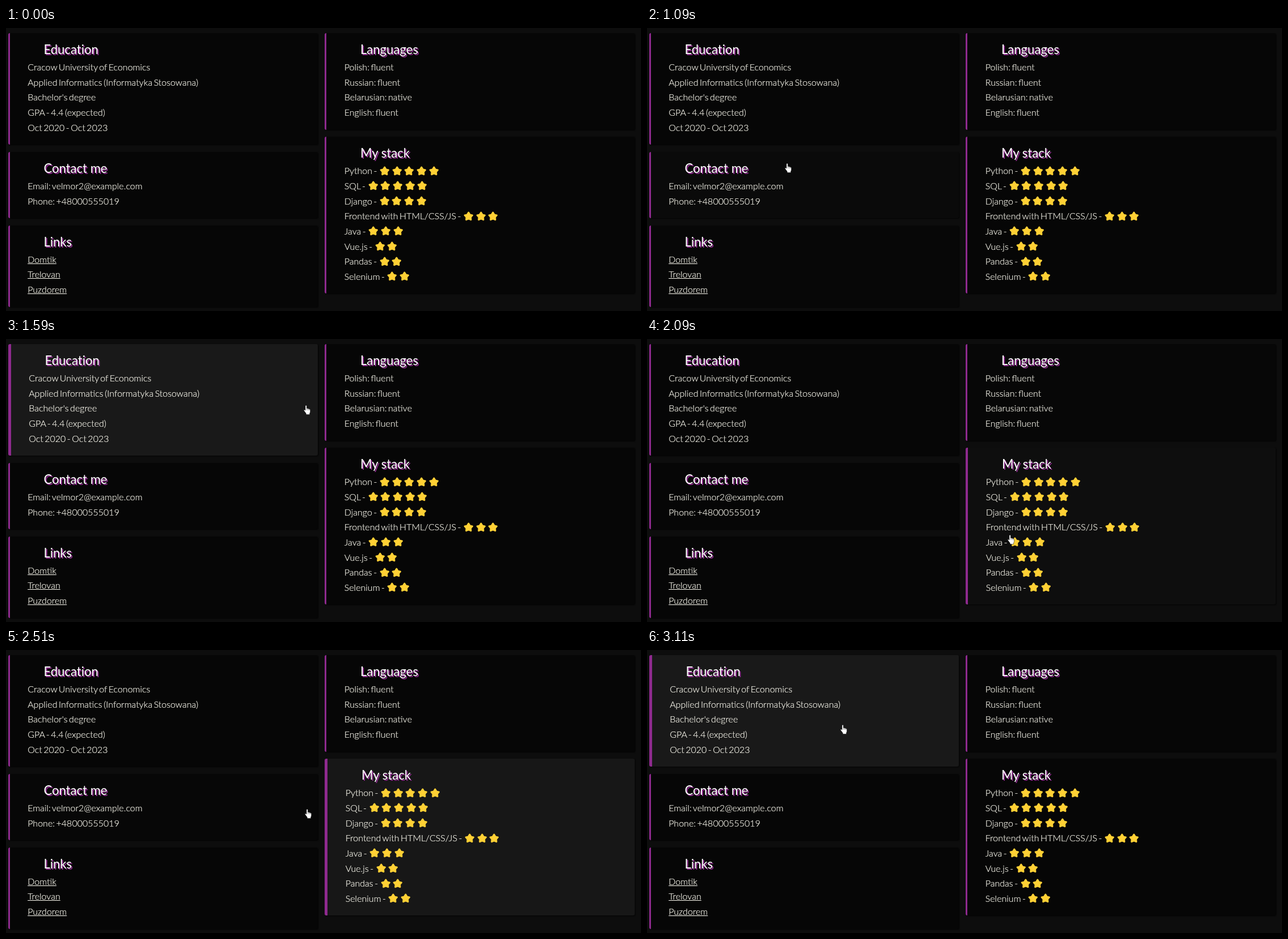
Recreate the animation shown at these times as an HTML page. Size 1120 by 500 pixels, loop 3210 ms.

```html
<!DOCTYPE html>
<html lang="en">
<head>
<meta charset="utf-8">
<title>About me</title>
<style>
html, body { margin: 0; width: 100%; height: 100%; overflow: hidden; background: #0d0d0d; }
body { position: relative; font: 300 16px Lato, sans-serif; color: #fffdf2; }
.col { position: absolute; top: 9px; width: 546.6px; }
.card {
  box-sizing: border-box; margin-bottom: 12.6px; padding: 10px 0 17px 31.4px;
  border-left: 3px solid #8e2a8e; border-radius: 3px;
  background: #060606; box-shadow: 1px 1px 2px #040404; white-space: pre;
}
h2 {
  margin: 0 0 0 28.2px; font-size: 22.1px; font-weight: 400; line-height: 37px;
  color: #fff; text-shadow: 2px 2px #8e2a8e; font-variant-ligatures: none;
}
p {
  margin: 0; height: 26.67px; line-height: 26.67px;
  word-spacing: -1.85px; -webkit-text-stroke: .2px;
}
u { text-decoration-thickness: 1px; }
.star { width: 21.7px; height: 17px; vertical-align: -2.6px; }
.star path { fill: #ffd035; stroke: #ffd035; stroke-width: 3; stroke-linejoin: round; }
#hand { position: absolute; left: 0; top: 0; width: 12px; height: 17px; overflow: visible; }
</style>
</head>
<body>
<div class="col" style="left:3.8px"></div>
<div class="col" style="left:562.4px"></div>
<svg id="hand" viewBox="0 0 12 17">
  <path fill="#fff" stroke="#000" stroke-width=".5" d="M3 1.5Q3 .2 4.2 .2T5.4 1.5V5.6Q7.3 5.2 7.6 6.2Q9.3 5.8 9.6 6.8Q11.6 6.6 11.6 8.4V11.5Q11.6 13 10.6 14.2V16.5H4.4V15Q3.6 13.6 2 11.6L.4 9.3Q0 8.2 1 7.9Q2 7.8 3 9.2Z"/>
  <path stroke="#333" stroke-width=".5" d="M5.4 6v3M7.6 6.4v2.8M9.6 7v2.3"/>
</svg>
<script>
const LOOP = 3210, START = 690, FADE = 300;

const starPath = 'M' + Array.from({ length: 10 }, (_, i) => {
  const r = i % 2 ? 3.9 : 7, a = Math.PI * (i / 5 - 0.5);
  return (10.85 + r * Math.cos(a)).toFixed(2) + ' ' + (9 + r * Math.sin(a)).toFixed(2);
}).join('L') + 'Z';
const star = `<svg class="star" viewBox="0 0 21.7 17"><path d="${starPath}"/></svg>`;
const skill = (name, n) => `${name} - ${star.repeat(n)}`;

// hover: [enter, leave] times in ms
const cards = [
  { col: 0, title: 'Education', hover: [[1330, 1590], [2845, 9999]], lines: [
    'Cracow University of Economics', 'Applied Informatics (Informatyka Stosowana)',
    "Bachelor's degree", 'GPA - 4.4 (expected)', 'Oct 2020 - Oct 2023'] },
  { col: 0, title: 'Contact me', hover: [[1000, 1240], [2480, 2810]], lines: [
    'Email: velmor2@example.com', 'Phone: +48000555019'] },
  { col: 0, title: 'Links', hover: [[690, 840]], lines: [
    '<u>Domtik</u>', '<u>Trelovan</u>', '<u>Puzdorem</u>'] },
  { col: 1, title: 'Languages', hover: [[1640, 1830]], lines: [
    'Polish: fluent', 'Russian: fluent', 'Belarusian: native', 'English: fluent'] },
  { col: 1, title: 'My stack', hover: [[1960, 2440]], lines: [
    skill('Python', 5), skill('SQL', 5), skill('Django', 4), skill('Frontend with HTML/CSS/JS', 3),
    skill('Java', 3), skill('Vue.js', 2), skill('Pandas', 2), skill('Selenium', 2)] }
];

// pointer path: time, x, y
const path = [
  [690, 246, 474], [890, 250, 350], [1090, 249, 247], [1190, 250, 232], [1290, 290, 196],
  [1390, 380, 160], [1490, 470, 138], [1590, 531, 125], [1690, 600, 118], [1790, 655, 125],
  [1890, 672, 170], [1990, 662, 270], [2090, 642, 354], [2210, 625, 372], [2410, 575, 317],
  [2610, 490, 262], [2810, 398, 178], [2910, 362, 151], [3010, 347, 140], [3210, 347, 140]
];

const cols = document.querySelectorAll('.col');
const hand = document.getElementById('hand');
for (const c of cards) {
  c.el = document.createElement('div');
  c.el.className = 'card';
  c.el.innerHTML = `<h2>${c.title}</h2>` + c.lines.map(s => `<p>${s}</p>`).join('');
  cols[c.col].append(c.el);
}

const ease = x => {
  x = Math.min(1, Math.max(0, x));
  return x * x * (3 - 2 * x);
};
const glow = (t, [enter, leave]) => ease((t - enter) / FADE) * (1 - ease((t - leave) / FADE));

// the picture moves in steps of 100 ms, with one step of 120 ms
function step(t) {
  if (t < START) return 0;
  const base = t < 2210 ? START : 2210;
  const s = base + Math.floor((t - base) / 100) * 100;
  return t < 2210 ? Math.min(s, 2090) : s;
}

function pointAt(t) {
  const i = path.findIndex(k => k[0] > t);
  const [t0, x0, y0] = path[i - 1], [t1, x1, y1] = path[i];
  const f = (t - t0) / (t1 - t0);
  return [x0 + (x1 - x0) * f, y0 + (y1 - y0) * f];
}

function draw(now) {
  const t = step(now % LOOP);
  for (const c of cards) {
    const p = Math.max(...c.hover.map(h => glow(t, h)));
    const g = Math.round(6 + 20 * p);
    c.el.style.borderLeftWidth = Math.floor(3 + 3 * p) + 'px';
    c.el.style.backgroundColor = `rgb(${g},${g},${g})`;
  }
  hand.style.visibility = t ? 'visible' : 'hidden';
  if (t) {
    const [x, y] = pointAt(t);
    hand.style.transform = `translate(${Math.round(x - 6)}px,${Math.round(y - 8.5)}px)`;
  }
}

const begin = performance.now();
function tick() {
  draw(performance.now() - begin);
  requestAnimationFrame(tick);
}
tick();
</script>
</body>
</html>
```
